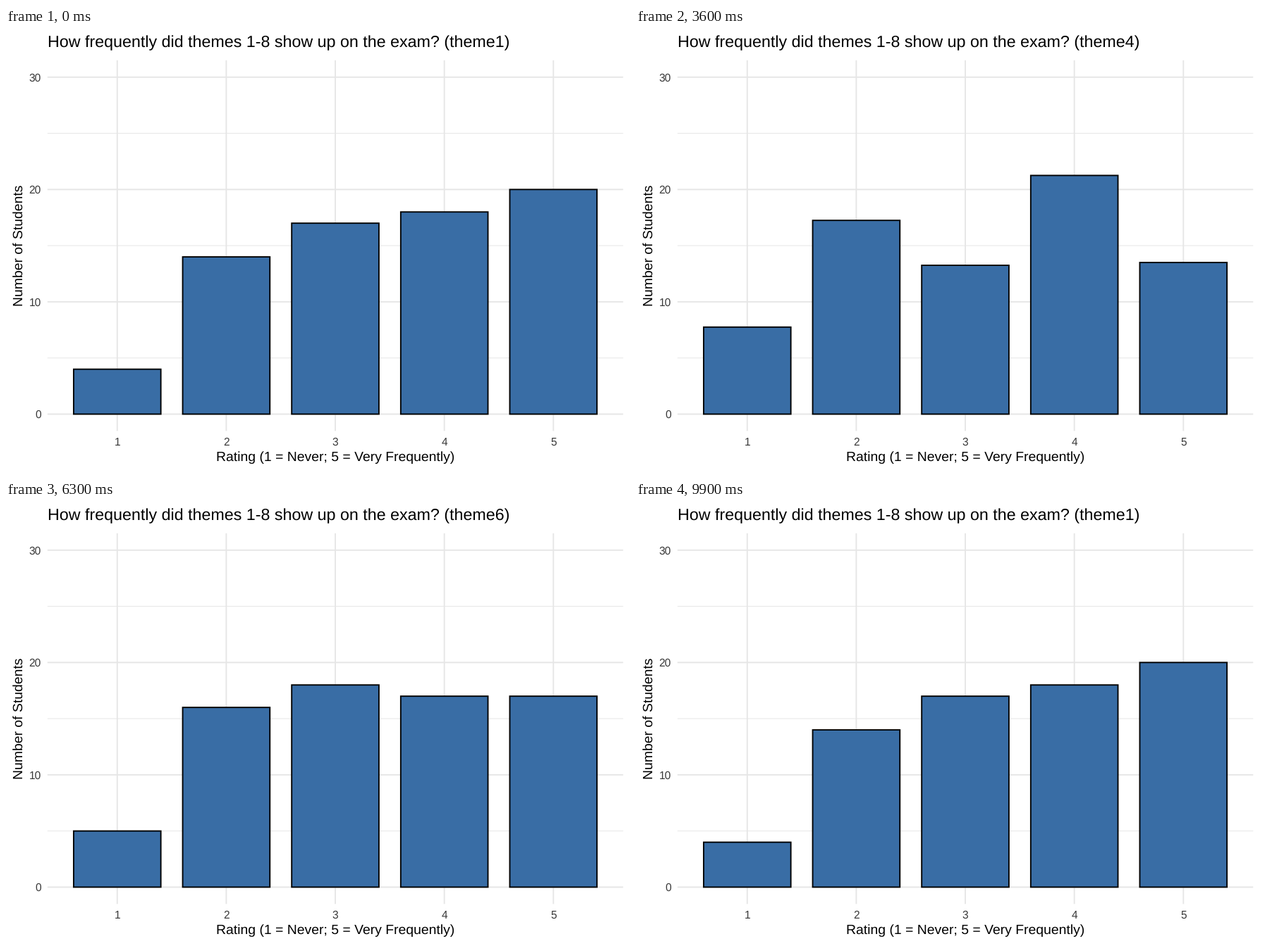
A matplotlib script that plays this animation: 885x632 px, repeating every 10 s.

```python
import matplotlib.pyplot as plt
from matplotlib.animation import FuncAnimation
from matplotlib.patches import Rectangle

plt.rcParams.update({
    "font.family": "Liberation Sans",
    "text.hinting": "none",
    "text.hinting_factor": 8,
    "path.snap": False,
})

W, H, DPI = 885, 632, 100
FRAMES, INTERVAL = 100, 100

# Number of students per rating 1-5, one row per theme
COUNTS = [
    [4, 14, 17, 18, 20],
    [8, 16, 27, 14, 8],
    [16, 30, 14, 7, 6],
    [5, 13, 13, 26, 16],
    [6, 11, 16, 23, 17],
    [5, 16, 18, 17, 17],
    [6, 10, 19, 21, 17],
    [7, 5, 20, 23, 18],
]
# Last still frame of each theme and the number of steps to the next one
STARTS = [4, 17, 30, 43, 55, 68, 80, 92]
STEPS = [8, 8, 8, 7, 8, 7, 7, 7]

LEFT, RIGHT, TOP, BOTTOM = 58.8, 875.3, 45.9, 572.3
X_UNIT = (RIGHT - LEFT) / 5.28
Y_ZERO, Y_UNIT = 548.4, 15.953
BAR_WIDTH = 0.8
BLUE, GRID, TICK = "#396DA5", "#E6E6E6", "#393939"
BASE = 19.4
THICK = 1.88


def pt(px):
    return px * 72 / DPI


def x_pos(rating):
    return LEFT + (rating - 0.36) * X_UNIT


def y_pos(count):
    return Y_ZERO - count * Y_UNIT


fig = plt.figure(figsize=(W / DPI, H / DPI), dpi=DPI, facecolor="white")
ax = fig.add_axes([0, 0, 1, 1])
ax.set_xlim(0, W)
ax.set_ylim(H, 0)
ax.axis("off")


def grid_line(xs, ys, width):
    ax.plot(xs, ys, color=GRID, lw=pt(width), solid_capstyle="butt",
            zorder=1, snap=False)


def label(x, y, text, px, color="black", **kw):
    kw = {"ha": "center", "va": "baseline", **kw}
    return ax.text(x, y, text, fontsize=pt(px), color=color, **kw)


for count in (5, 15, 25):
    grid_line([LEFT, RIGHT], [y_pos(count)] * 2, THICK / 2)
for count in (0, 10, 20, 30):
    grid_line([LEFT, RIGHT], [y_pos(count)] * 2, THICK)
    label(49.8, y_pos(count) + 5.6, str(count), 0.8 * BASE, TICK, ha="right")
for rating in range(1, 6):
    grid_line([x_pos(rating)] * 2, [TOP, BOTTOM], THICK)
    label(x_pos(rating), 592.6, str(rating), 0.8 * BASE, TICK)

label((LEFT + RIGHT) / 2, 615, "Rating (1 = Never; 5 = Very Frequently)", BASE)
label(23.8, (TOP + BOTTOM) / 2, "Number of Students", BASE,
      rotation=90, rotation_mode="anchor")
title = label(LEFT, 27.2, "", 1.2 * BASE, ha="left")

bars = [
    ax.add_patch(Rectangle((x_pos(r - BAR_WIDTH / 2), Y_ZERO),
                           BAR_WIDTH * X_UNIT, 0, facecolor=BLUE,
                           edgecolor="black", lw=pt(THICK),
                           joinstyle="miter", zorder=2, snap=False))
    for r in range(1, 6)
]


def state_at(frame):
    """Current theme, next theme and the progress between them."""
    theme = max((i for i, s in enumerate(STARTS) if s < frame), default=None)
    if theme is None:
        return 0, 1, 0.0
    progress = min(1.0, (frame - STARTS[theme]) / STEPS[theme])
    return theme, (theme + 1) % len(COUNTS), progress


def update(frame):
    now, following, t = state_at(frame)
    for bar, a, b in zip(bars, COUNTS[now], COUNTS[following]):
        bar.set_height(-(a + (b - a) * t) * Y_UNIT)
    shown = following if t >= 0.5 else now
    title.set_text("How frequently did themes 1-8 show up on the exam? "
                   f"(theme{shown + 1})")
    return [*bars, title]


anim = FuncAnimation(fig, update, frames=FRAMES, interval=INTERVAL,
                     init_func=lambda: update(0), repeat=True, repeat_delay=0)
plt.show()
```
